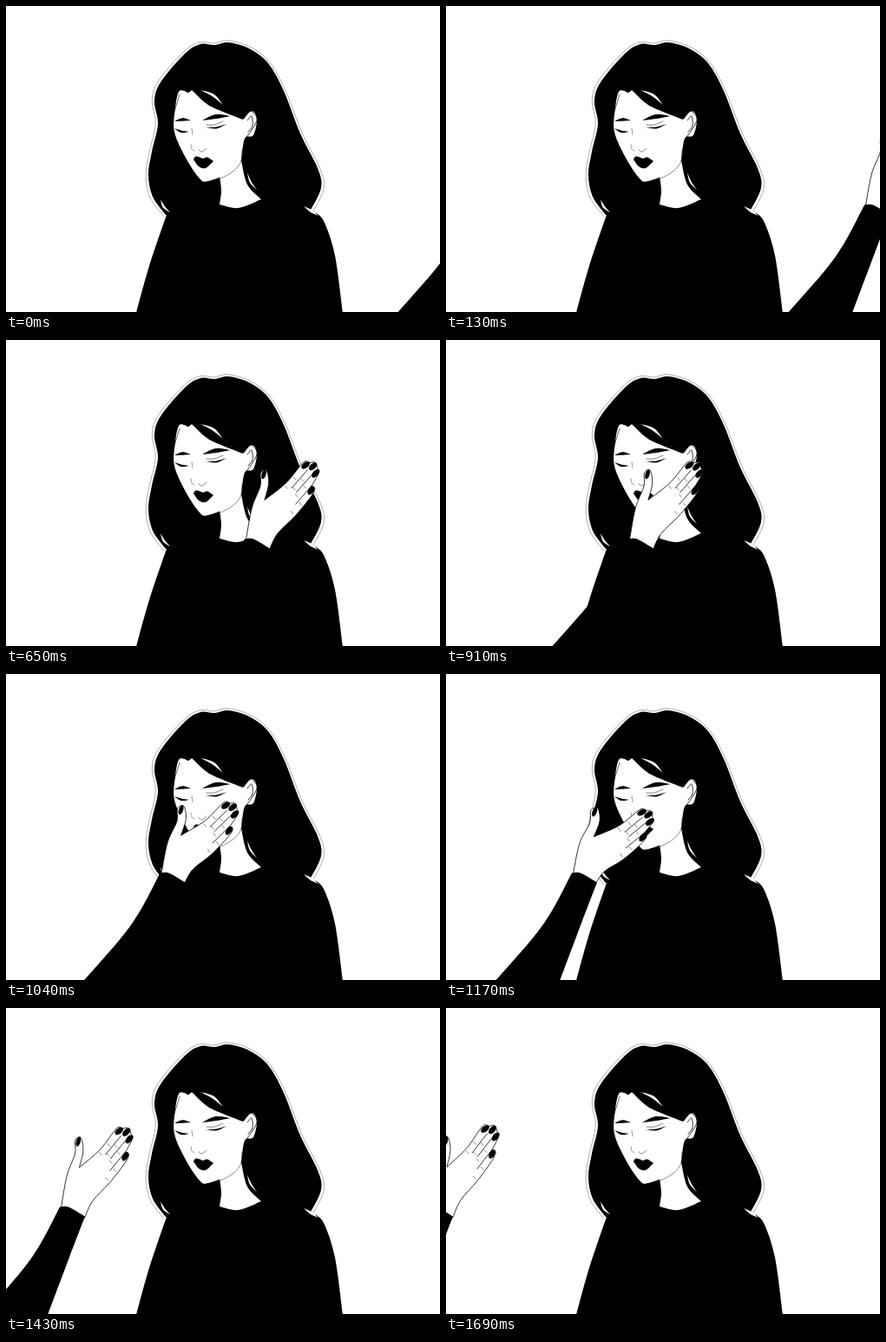
Animation of 500 by 353 pixels, one loop 1.82 s. Source, as an HTML page with a canvas:

```html
<!DOCTYPE html>
<html lang="en">
<head>
<meta charset="utf-8">
<title>Passing hand</title>
<style>
html, body { margin: 0; width: 100%; height: 100%; overflow: hidden; background: #fff; }
canvas { display: block; }
</style>
</head>
<body>
<canvas id="stage" width="500" height="353"></canvas>
<script>
const ctx = document.getElementById('stage').getContext('2d');
const STEP = 130, STEPS = 14;
const RAD = Math.PI / 180;

// Wrist position by step: fast entry, slower across the face, faster exit.
const PATH = [[0, 539], [3, 368], [5, 275], [9, 145], [13, -21]];

// Nail centres from index to little finger, measured from the wrist.
const TIPS = [[66, -90], [74.5, -89], [78, -81], [74, -61]];
const THUMB = [20.5, -76];

const HAIR = [184, 241, 169, 220, 164, 195, 168, 168, 175, 136, 171, 110, 178, 88, 206, 55,
  224, 44, 240, 45, 256, 42, 280, 49, 302, 66, 320, 98, 339, 147, 359, 187, 363, 210, 350, 237];

const same = (x, y) => [x, y];
const widen = (x, y) => [262 + (x - 262) * 1.03, 150 + (y - 150) * 1.02];

// Adds a Catmull-Rom curve through [x0, y0, x1, y1, ...] to the path.
function addCurve(pts, map) {
  const p = [];
  for (let i = 0; i < pts.length; i += 2) p.push(map(pts[i], pts[i + 1]));
  ctx.lineTo(...p[0]);
  for (let i = 0; i < p.length - 1; i++) {
    const a = p[i - 1] || p[i], b = p[i], c = p[i + 1], d = p[i + 2] || c;
    ctx.bezierCurveTo(
      b[0] + (c[0] - a[0]) / 6, b[1] + (c[1] - a[1]) / 6,
      c[0] - (d[0] - b[0]) / 6, c[1] - (d[1] - b[1]) / 6, c[0], c[1]);
  }
}

function shape(color, curves, map = same) {
  ctx.beginPath();
  curves.forEach(c => addCurve(c, map));
  ctx.closePath();
  ctx.fillStyle = color;
  ctx.fill();
}

function line(width, pts, color = '#000', map = same) {
  ctx.beginPath();
  addCurve(pts, map);
  ctx.lineWidth = width;
  ctx.strokeStyle = color;
  ctx.stroke();
}

// A stroke that is thick in the middle and pointed at both ends.
function taper(color, x0, y0, x1, y1, bow, thick) {
  const len = Math.hypot(x1 - x0, y1 - y0), nx = (y1 - y0) / len, ny = (x0 - x1) / len;
  const mid = b => [(x0 + x1) / 2 + nx * b, (y0 + y1) / 2 + ny * b];
  shape(color, [[x0, y0, ...mid(bow + thick / 2), x1, y1], [x1, y1, ...mid(bow - thick / 2), x0, y0]]);
}

function drawFigure() {
  shape('#000', [
    [246, 226, 186, 238], [186, 238, 165, 300, 150, 354],
    [388, 354, 379, 288, 367, 250, 358, 239], [358, 239, 320, 225]
  ]);
  shape('#000', [HAIR]);
  line(.6, HAIR, '#777', widen);

  // neck
  shape('#fff', [[246, 196, 248, 213, 246, 229], [246, 229, 268, 233, 294, 223], [294, 223, 278, 206, 271, 178]]);
  // face and ear
  shape('#fff', [
    [206, 98, 199, 99, 195, 118, 194, 145, 207, 175, 223, 199, 233, 202, 260, 191, 271, 178],
    [271, 178, 275, 153, 285, 149, 289, 130, 283, 121, 273, 131],
    [273, 131, 245, 120, 230, 112, 214, 97], [214, 97, 210, 100, 206, 98]
  ]);
  line(.6, [245, 200, 260, 192, 270, 181, 272, 166], '#444');
  line(.8, [274, 130, 282, 121, 289, 132, 276, 153]);
  line(.8, [278, 132, 283, 127, 284, 138, 279, 145]);

  // loose strands
  taper('#fff', 224, 97, 250, 114, 3, 3);
  taper('#fff', 278, 192, 289, 212, -2, 2);
  taper('#fff', 178, 223, 189, 238, -2, 2.5);
  taper('#fff', 343, 231, 360, 242, 0, 3);
  line(.6, [200, 102, 197, 112, 193, 124], '#000');
}

function drawFeatures() {
  taper('#000', 194, 133, 213, 132, 1.5, 3.5);
  taper('#000', 226, 132, 259, 127, 2, 5);
  taper('#000', 194, 141, 211, 145, -2, 2.5);
  taper('#000', 230, 140, 254, 136, -2.5, 2);
  line(.6, [231, 137, 240, 137, 250, 133], '#333');
  line(.6, [214, 141, 215, 148], '#555');
  line(.6, [213, 160, 214, 165, 217, 167], '#555');
  line(.7, [222, 166, 226, 168, 231, 164], '#555');
  shape('#000', [
    [216, 177, 219, 173.5, 227, 176], [227, 176, 232, 174.5, 239, 179],
    [239, 179, 230, 187, 222, 185, 216, 177]
  ]);
}

function pose(step) {
  const i = PATH.findIndex(key => key[0] > step);
  const [a, b] = PATH.slice(i < 0 ? -2 : i - 1);
  return {
    x: a[1] + (b[1] - a[1]) * (step - a[0]) / (b[0] - a[0]),
    y: 229.5,
    // the hand tips over as it leaves the cheek
    bend: RAD * (4 * Math.cos(step / 13 * Math.PI / 2) + 11 * Math.exp(-((step - 9) ** 2) / 1.5))
  };
}

function drawNail([x, y], map, width, angle) {
  ctx.beginPath();
  ctx.ellipse(...map(x, y), 5.7, width, angle, 0, 7);
  ctx.fillStyle = '#000';
  ctx.fill();
}

function drawArm({ x: wx, y: wy, bend }) {
  const place = (x, y) => [wx + x, wy + y];
  // Turns around the wrist, fully at the fingers and less near the thumb.
  const flex = (x, y) => {
    const turn = bend * Math.min(1, Math.max(0, x / 50)), size = 1 - bend * .2;
    const c = Math.cos(turn) * size, s = Math.sin(turn) * size;
    return place(x * c - y * s, x * s + y * c);
  };

  shape('#fff', [
    [1, 4, 8, -36, 17, -62, 17, -77, 23, -81, 26, -66, 22, -46],
    [22, -46, 45, -68, 63, -93, 70, -93], [70, -93, 77, -94, 80, -87],
    [80, -87, 82, -82, 73, -64], [73, -64, 78, -64, 75, -55, 57, -30, 38, -8, 29, 12]
  ], flex);
  ctx.lineWidth = .8;
  ctx.strokeStyle = '#000';
  ctx.stroke();

  TIPS.forEach(([x, y], i) => {
    drawNail([x, y], flex, 3.2, bend - RAD * (40 + 7 * i));
    for (const k of [1, 1.7])
      line(.6, [x - 13 * k, y + 15 * k, x - 13 * k + 3, y + 15 * k + 3], '#333', flex);
    if (i === 0) return;
    const gx = (x + TIPS[i - 1][0]) / 2 - 2, gy = (y + TIPS[i - 1][1]) / 2 + 5;
    line(.8, [gx, gy, gx - 17, gy + 22], '#000', flex);
  });
  drawNail(THUMB, flex, 2.5, bend / 2 - RAD * 75);

  // sleeve
  shape('#000', [
    [0, 0, 10, 0, 29, 11], [29, 11, 11, 58, -16, 130],
    [-93, 130, -45, 75, -22, 42, 0, 0]
  ], place);
}

function draw() {
  const step = Math.floor((performance.now() - start) / STEP) % STEPS;
  ctx.fillStyle = '#fff';
  ctx.fillRect(0, 0, 500, 353);
  drawFigure();
  drawFeatures();
  drawArm(pose(step));
  requestAnimationFrame(draw);
}

ctx.lineCap = ctx.lineJoin = 'round';
const start = performance.now();
draw();
</script>
</body>
</html>
```
